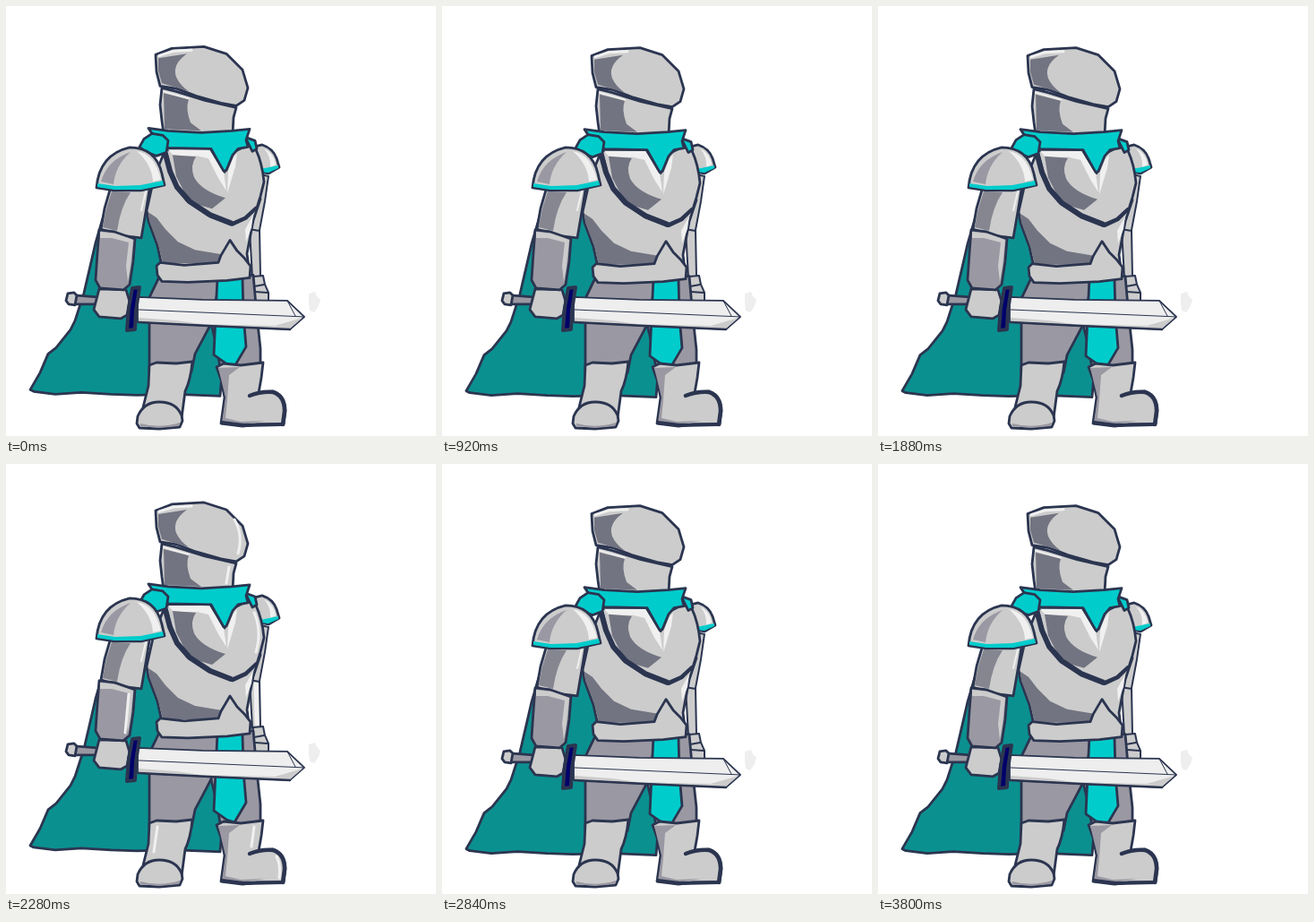
An HTML page for the animation above (3.84 s loop, 480x480 px).

```html
<!DOCTYPE html>
<html lang="en">
<head>
<meta charset="utf-8">
<title>Knight idle</title>
<style>
  html, body { margin: 0; width: 100%; height: 100%; overflow: hidden; background: #fff; }
  svg { display: block; width: 100vw; height: 100vh; }
  path { stroke-linejoin: round; stroke-linecap: round; }
  .o { stroke: #2b3550; stroke-width: 2.8; }
  .light { fill: #ccc; }
  .mid { fill: #9a98a2; }
  .dusk { fill: #858690; }
  .dark { fill: #727481; }
  .shine { fill: #f0f0f0; }
  .cyan { fill: #00cccc; }
  .cape { fill: #0b9090; }
  .line { fill: none; stroke: #2b3550; stroke-width: 2; }
  .glint, .gleam { fill: none; stroke: #f0f0f0; stroke-width: 3; }
</style>
</head>
<body>
<svg viewBox="0 0 480 480">
  <!-- cape -->
  <g class="body">
    <path class="cape o" d="M110 230L107 240 100 264 94 290 87 320 77 351 72 361 56 381 47 388 38 409 27 428 31 430 55 433 84 431 117 433 146 434 190 433 239 435 250 300 165 225Z"/>
  </g>

  <!-- far arm -->
  <g class="arm">
    <path class="light o" style="stroke-width:2" d="M284 188L293 190 289 218 283 250 284 302 275 303 272 250 277 218Z"/>
    <path class="gleam" style="stroke-width:5" d="M279 254L280 298"/>
    <path class="line" d="M271 249L283 251"/>
    <path class="light o" style="stroke-width:2" d="M276 302L287 301 289 311 293 320 293 329 277 329 275 314Z"/>
    <path class="line" d="M277 313L288 311M278 319L292 320"/>
    <path class="light o" d="M278 157L286 155Q298 159 302 170L305 180 293 187 282 185Z"/>
    <path class="shine" d="M288 159Q299 164 301 177L295 180Q296 168 288 159Z"/>
    <path class="cyan" d="M284 182L304 178 304 181 293 186 283 185Z"/>
  </g>

  <!-- legs -->
  <g class="body">
    <path class="mid o" d="M172 300H241L229 354 220 371 211 388 207 408H160L160 325Z"/>
    <path class="mid o" d="M240 300H276L280 345 284 382V408H240L234 375 229 354Z"/>
    <path class="cyan o" d="M236 302L264 303 265 345 268 380 255 402 246 399 232 389 234 345Z"/>
  </g>

  <!-- boots -->
  <path class="light o" d="M160 401L168 398 190 399 208 397Q206 418 200 430L196 460 156 456 153 448 159 424Z"/>
  <path class="light o" d="M147 458Q154 442 171 442 190 442 196 457L197 463 194 470 171 472 149 471 146 466Z"/>
  <path class="mid" d="M150 466Q172 472 194 465L193 469 171 471 150 469Z"/>
  <path class="gleam" d="M169 405L165 433"/>
  <path class="light o" d="M235 403L243 399 262 401 287 398 285 415 282 432 298 430Q312 435 312 452L310 467 281 467 264 469 240 466 244 437 240 417Z"/>
  <path class="mid" d="M237 404L261 403 249 412 247 440 245 460 262 464 290 463 262 467 241 465 245 437Z"/>
  <path class="gleam" d="M277 405L274 427M302 438Q307 448 305 462"/>
  <path class="line" style="stroke-width:4.5" d="M272 435Q285 430 298 431 311 435 311 452L309 467"/>
  <path class="line" style="stroke-width:4" d="M241 465L265 468 309 467"/>

  <!-- torso -->
  <g class="body">
    <path class="light o" d="M177 162L165 192 157 228 159 240 169 267 174 290 271 291 269 276 276 239 284 215 270 160Z"/>
    <path class="dark" d="M159 230L168 236 178 249 192 263 211 272 241 277 236 287 175 287 170 266 160 240Z"/>
    <path class="shine" d="M267 249L276 233 274 247 268 263Z"/>
    <path class="light o" d="M178 160L228 159 244 185 252 164 269 155 279 160Q286 175 288 196L284 212 280 225 268 237 253 244 225 233 202 217 188 198Z"/>
    <path class="shine" d="M181 160L227 160 239 180 243 185 246 206 237 192 226 170 213 167 187 167Z"/>
    <path class="dark" d="M186 166L212 168Q205 178 210 191 218 206 245 214L230 226 216 222 202 213 190 190Z"/>
    <path class="shine" d="M248 184L253 170 258 164 256 179 247 209Z"/>
    <path class="gleam" d="M277 168Q286 189 279 212"/>
    <path class="line" style="stroke-width:6" d="M178 165L183 184 191 202 205 218 228 233 251 242"/>
    <path class="line" style="stroke-width:3.5" d="M251 243L267 236 279 225"/>
    <path class="light o" d="M168 290L172 286 199 289 237 286 240 278 250 261 258 273 266 281 273 290 272 303 247 306 203 308 174 307 169 300Z"/>

    <!-- helmet -->
    <path class="light o" d="M174 91L190 95 222 105 257 113 254 124 253 142H176L174 128 172 110Z"/>
    <path class="dark" d="M176 97L204 104Q200 114 206 130L218 139 177 137Z"/>
    <path class="glint" style="stroke-width:2" d="M176 95L204 103"/>
    <path class="gleam" d="M249 117L246 135"/>
    <path class="light o" d="M167 54L185 47 221 45 246 53 264 71 270 91 266 105 257 111 240 108 212 100 191 92 172 89 168 73Z"/>
    <path class="dark" d="M170 58L202 53Q185 65 190 79 194 88 204 95L174 86 170 72Z"/>
    <path class="glint" d="M171 55L187 50 207 49"/>
    <path class="gleam" d="M255 64Q265 81 259 102"/>

    <!-- collar -->
    <path class="cyan o" d="M267 146L278 150 280 159 275 162Z"/>
    <path class="cyan o" d="M159 136L181 139 218 141 252 139 272 137 268 149 270 157 259 159 253 166 246 183 243 184 234 168 229 159 181 158 170 145 163 142Z"/>
    <path class="cyan o" d="M149 157L154 148 163 142 175 144 181 150 179 163 168 167 157 163Z"/>
  </g>

  <!-- sword and near arm -->
  <g class="arm">
    <path fill="#eee" d="M338 321L345 319 347 324 351 328 349 335 344 342 339 340 338 331Z"/>
    <path class="mid o" d="M76 323L102 325V333L76 333Z"/>
    <path class="light o" d="M69 321L76 320 79 323 77 334 70 333 67 329Z"/>
    <path class="o" fill="#eee" style="stroke-width:1.8" d="M147 325L220 328 314 329 333 347 317 361 225 357 147 353Z"/>
    <path class="light" d="M148 348L190 351 218 355 300 357 331 348 317 360 225 356 148 352Z"/>
    <path class="line" style="stroke-width:1" d="M148 339L240 343 333 347M314 329L323 346"/>
    <path class="line" style="stroke-width:2.5" d="M148 353L225 357 317 361"/>
    <path class="light o" d="M104 316L134 317 138 330 135 345 128 349 104 347 98 339Z"/>
    <path class="o" fill="#00006a" style="stroke-width:4" d="M141 315L149 314 145 340 144 361 135 362 137 337Z"/>
    <path class="light o" d="M117 202L161 199 157 224 151 259 126 256 106 249 110 226Z"/>
    <path class="dusk" d="M118 207L139 208Q128 224 124 251L108 247 112 226Z"/>
    <path class="glint" style="stroke-width:2" d="M156 207L151 228"/>
    <path class="mid o" d="M104 250L121 252 144 260 142 285 138 311 131 317 105 315 100 306 102 276Z"/>
    <path class="light" d="M105 252L122 254 142 261 139 290 136 308 134 290 137 264 118 259 105 259Z"/>
    <path class="gleam" d="M137 265L133 308"/>
    <path class="light o" d="M101 203Q104 166 138 158 167 158 174 187L177 200 151 206 121 206Z"/>
    <path class="mid" d="M106 196Q113 172 139 163 122 178 120 199Z"/>
    <path class="shine" d="M146 162Q166 165 173 194L164 196Q163 177 146 162Z"/>
    <path class="cyan" d="M102 198L122 201 150 200 175 195 176 200 151 205 121 205 102 202Z"/>
  </g>
</svg>
<script>
  const bodyParts = document.querySelectorAll('.body');
  const armParts = document.querySelectorAll('.arm');
  const gleams = document.querySelectorAll('.gleam');
  const LOOP = 3840, BREATH = 960, STEP = 40;

  const wave = (t, peak) => Math.cos(2 * Math.PI * (t - peak) / BREATH);
  const clamp = x => Math.max(0, Math.min(1, x));
  const shift = (parts, y) =>
    parts.forEach(p => p.setAttribute('transform', `translate(0 ${y.toFixed(2)})`));

  // The arms rise a quarter breath after the body; the armour gleams once per loop.
  function draw(now) {
    const t = Math.floor(now / STEP) * STEP % LOOP;
    shift(bodyParts, 1 - 5 * wave(t, 220));
    shift(armParts, -4.5 * (1 + wave(t, 460)));
    const gleam = clamp((t - 2200) / 80) * clamp((2560 - t) / 160);
    gleams.forEach(p => { p.style.opacity = gleam; });
  }

  const start = performance.now();
  function tick() {
    draw(performance.now() - start);
    requestAnimationFrame(tick);
  }
  tick();
</script>
</body>
</html>
```
